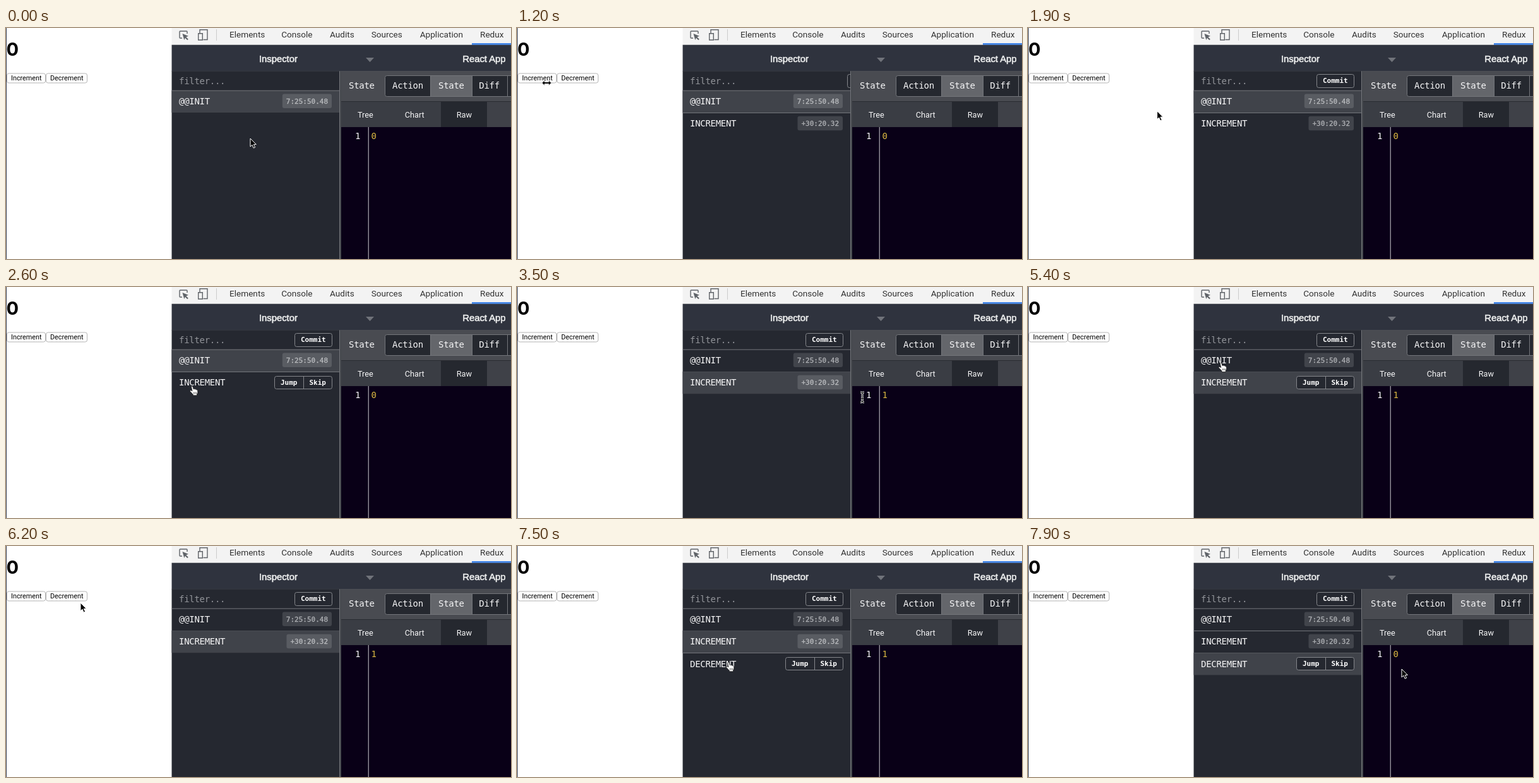
An HTML page for the animation above (8 s loop, 800 by 366 pixels).

```html
<!DOCTYPE html>
<html lang="en">
<head>
<meta charset="utf-8">
<style>
  html, body { margin: 0; width: 100%; height: 100%; overflow: hidden; background: #fff; }
  svg { display: block; width: 800px; height: 366px; }
  text { white-space: pre; }
  .mono { font-family: "DejaVu Sans Mono", monospace; font-size: 14px; letter-spacing: -.3px; fill: #f6f6f7; }
  .small { font-family: "DejaVu Sans Mono", monospace; font-size: 11px; }
  .bold { font-weight: 700; fill: #fff; }
  .tool { font-family: Roboto, sans-serif; font-size: 13.6px; fill: #333; }
  .tab { font-family: Roboto, sans-serif; font-size: 12.7px; fill: #f6f6f7; }
  .head { font-family: "Liberation Sans", Arial, sans-serif; font-size: 14.8px; fill: #eceded; stroke: #eceded; stroke-width: .6px; }
  .btn { font-family: Roboto, sans-serif; font-size: 10.8px; fill: #000; }
  .count { font-family: Inter, sans-serif; font-weight: 700; font-size: 29px; }
</style>
</head>
<body>
<svg id="stage" viewBox="0 0 800 366" xmlns="http://www.w3.org/2000/svg"></svg>
<script>
const LOOP = 8000, STEP = 100;
const LINE = '#74767b', DARK = '#252830';
const stage = document.getElementById('stage');

const rect = (x, y, w, h, fill, extra = '') =>
  `<rect x="${x}" y="${y}" width="${w}" height="${h}" fill="${fill}" ${extra}/>`;
const box = (x, y, w, h, fill, line, r = 3) =>
  rect(x + .5, y + .5, w - 1, h - 1, fill, `rx="${r}" stroke="${line}"`);
const text = (x, y, cls, s, extra = '') => `<text x="${x}" y="${y}" class="${cls}" ${extra}>${s}</text>`;
const path = (d, extra) => `<path d="${d}" ${extra}/>`;

function page() {
  return rect(0, 0, 262.5, 366, '#fff') + rect(0, 0, 1, 366, '#3a4358') +
    text(.5, 44.4, 'count', '0') +
    box(1, 71.5, 62, 16, '#fff', '#b4b4b4') + text(8, 83, 'btn', 'Increment') +
    box(63, 71.5, 66, 16, '#fff', '#b4b4b4') + text(70, 83, 'btn', 'Decrement');
}

function toolbar() {
  const tabs = [[354, 'Elements'], [436.2, 'Console'], [513, 'Audits'], [578.7, 'Sources'], [655.7, 'Application'], [751, 'Redux']];
  const line = 'fill="none" stroke="#5f6368" stroke-width="1.4"';
  return rect(262.5, 0, 538, 27, '#f3f3f3') + rect(262.5, 26, 538, .8, '#d6d6d6') +
    path('M279 16H276Q275 16 275 15V6Q275 5 276 5H286Q287 5 287 6V9', line) +
    path('M279.5 9L289 12.7L285.3 14.2L288.8 17.8L287.3 19.2L283.8 15.7L282.3 19Z', 'fill="#5f6368"') +
    path('M307 8V2.7H319V18.5H312.5M304.7 8.7H311.3V19H304.7Z', line) +
    rect(333, 2, 1, 18, '#ccc') +
    tabs.map(([x, s]) => text(x, 15, 'tool', s)).join('') +
    rect(738, 24, 62, 2.8, '#3f83e8');
}

function panels() {
  return rect(262.5, 26.8, 538, 42, '#2f333e') +
    text(401, 53.8, 'head', 'Inspector') + text(723.3, 53.8, 'head', 'React App') +
    path('M570 47H583L576.5 54Z', 'fill="#70737a"') +
    rect(262.5, 68.3, 267, 298, DARK) +
    text(274, 89, 'mono', 'filter...', 'style="fill:#93959a"') +
    rect(531, 68.3, 269, 48, '#494b51') + rect(531, 116, 269, 1, '#292b31') +
    text(543, 96, 'mono', 'State') +
    box(600, 75, 210, 34, '#25282f', LINE) + rect(673, 76, 65, 32, '#64666b') +
    [672, 738, 794].map(x => rect(x, 76, 1, 32, LINE)).join('') +
    text(612, 96, 'mono', 'Action') + text(685, 96, 'mono', 'State') + text(749.3, 96, 'mono', 'Diff') +
    rect(531, 117, 269, 40, '#3f4148') + rect(531, 117, 158, 40, '#3a3d44') + rect(689, 117, 73, 40, '#25282f') +
    text(557, 141.5, 'tab', 'Tree') + text(631.8, 141.5, 'tab', 'Chart') + text(713.8, 141.5, 'tab', 'Raw') +
    rect(531, 157, 269, 209, '#090017') + rect(573.6, 157, 1.3, 209, '#a19fa7') +
    text(553, 176, 'mono', '1') +
    rect(528, 68.3, 3, 298, '#45484d') + rect(528, 68.3, 1, 298, LINE);
}

const still = page() + toolbar() + panels() +
  `<clipPath id="list"><rect x="262" y="68" width="266" height="298"/></clipPath>`;
stage.innerHTML = `<g>${still}</g><g id="live"></g>`;
const live = document.getElementById('live');

// Pointer hotspot: time, x, y
const KEYS = [
  [0, 387, 175], [900, 50, 85], [1000, 47, 87], [1300, 47, 87],
  [2300, 290, 156], [2600, 293.5, 157], [2900, 293.5, 157],
  [3700, 594, 178], [4100, 590, 172], [4500, 573, 171], [4900, 573, 171],
  [5800, 112, 83], [6200, 118, 90], [6400, 104, 82], [6600, 104, 82],
  [7300, 333.5, 184], [7600, 333.5, 184], [7900, 592, 195], [8000, 592, 195]
];

function pointer(t) {
  t = Math.max(0, t);
  let i = 1;
  while (i < KEYS.length - 1 && KEYS[i][0] < t) i++;
  const [t0, x0, y0] = KEYS[i - 1], [t1, x1, y1] = KEYS[i];
  const k = (t - t0) / (t1 - t0);
  const e = t1 - t0 > 400 ? k * k * (3 - 2 * k) : k;
  return [x0 + (x1 - x0) * e, y0 + (y1 - y0) * e];
}

const SHAPES = {
  arrow: path('M0 0V13L3 10.2L5.2 15.2L7.6 14.1L5.3 9.4H9.3Z', 'fill="#000" stroke="#fff"'),
  hand: path('M0 1Q1.2-.8 2.4 1L3.7 5Q5.1 3.6 6 5.1Q7.6 4.3 8.2 5.9Q10 5.6 10.2 7.5V10.4L9 13V14.8H2.8V13.2L-2.2 7.9Q-2 6.3-.3 6.8L1.5 8Z',
    'fill="#fff" stroke="#111" stroke-width=".7"') + path('M4 9.5V12.5M6 9.5V12.5M8 9.5V12.5', 'stroke="#222" stroke-width=".7"'),
  resize: path('M-7.5 0L-3.2-4.2V-1.4H3.2V-4.2L7.5 0L3.2 4.2V1.4H-3.2V4.2Z', 'fill="#000" stroke="#fff" stroke-width=".8"'),
  beam: ['#fff;stroke-width:3', '#111;stroke-width:1.2'].map(s =>
    path('M-3-8Q0-8 0-5.5Q0-8 3-8M0-5.5V5.5M-3 8Q0 8 0 5.5Q0 8 3 8M-2 2H2', `style="fill:none;stroke:${s}"`)).join('')
};

function shapeAt(t, x, over) {
  if (t >= 3500 && t < 5000) return 'beam';
  if (t < 1500 && x < 264) return 'resize';
  if (Math.abs(x - 262) < 6) return 'resize';
  return over >= 0 && t < 7800 ? 'hand' : 'arrow';
}

function pair(y) {
  return box(425, y, 92, 21, DARK, '#85878c') + rect(471, y + 1, 1, 19, '#85878c') +
    text(435, y + 14.2, 'small bold', 'Jump') + text(480.5, y + 14.2, 'small bold', 'Skip');
}

function row(i, name, stamp, chosen, hover, last) {
  const y = 99 + i * 35.2, on = i === chosen;
  const w = stamp.length * 6.62 + 12, ink = on ? '#bbbdc0' : '#b0b2b6';
  let s = on ? rect(262.5, y, 266, 35, '#40434a') : '';
  if (!last) s += rect(262.5, Math.round(y + 35), 266, 1, LINE);
  s += text(274, y + 22.2, 'mono', name);
  if (hover && i > 0) return s + pair(Math.round(y + 7));
  return s + rect(516 - w, y + 5.5, w, 22.5, on ? '#595c62' : '#41444b', 'rx="3"') +
    text(522 - w, y + 20.5, 'small', stamp, `style="fill:${ink};stroke:${ink};stroke-width:.3px"`);
}

function rowAt([x, y], n) {
  const i = Math.floor((y - 99) / 35.2);
  return x > 262 && x < 528 && i >= 0 && i < n ? i : -1;
}

function draw(t) {
  const rows = [['@@INIT', '7:25:50.48'], ['INCREMENT', '+30:20.32'], ['DECREMENT', '+05:04.16']];
  const n = t < 1100 ? 1 : t < 6600 ? 2 : 3;
  const chosen = t < 2900 ? 0 : t < 7700 ? 1 : 2;
  const hover = rowAt(pointer(t - 150), n);
  const [x, y] = pointer(t);
  let s = '<g clip-path="url(#list)">';
  for (let i = 0; i < n; i++) s += row(i, ...rows[i], chosen, hover === i, i === n - 1);
  s += rect(262.5, 98.7, 266, 1, LINE);
  if (t >= 1200) {
    const cx = Math.max(457, 523 - (t - 1200) * .33);
    s += box(cx, 73, 60, 22, DARK, '#85878c') + text(cx + 10, 87.3, 'small bold', 'Commit');
  }
  s += '</g>';
  const picked = t >= 4400 && t < 4700;
  if (picked) s += rect(579, 162, 8, 19, '#304a7c');
  s += text(578.5, 176, 'mono', chosen === 1 ? '1' : '0', `style="fill:${picked ? '#b9a76a' : '#d8b641'}"`);
  s += `<g transform="translate(${x.toFixed(1)} ${y.toFixed(1)})">${SHAPES[shapeAt(t, x, rowAt([x, y], n))]}</g>`;
  live.innerHTML = s;
}

let shown = -1;
function tick() {
  const t = Math.floor(performance.now() % LOOP / STEP) * STEP;
  if (t !== shown) draw(shown = t);
  requestAnimationFrame(tick);
}
tick();
</script>
</body>
</html>
```
